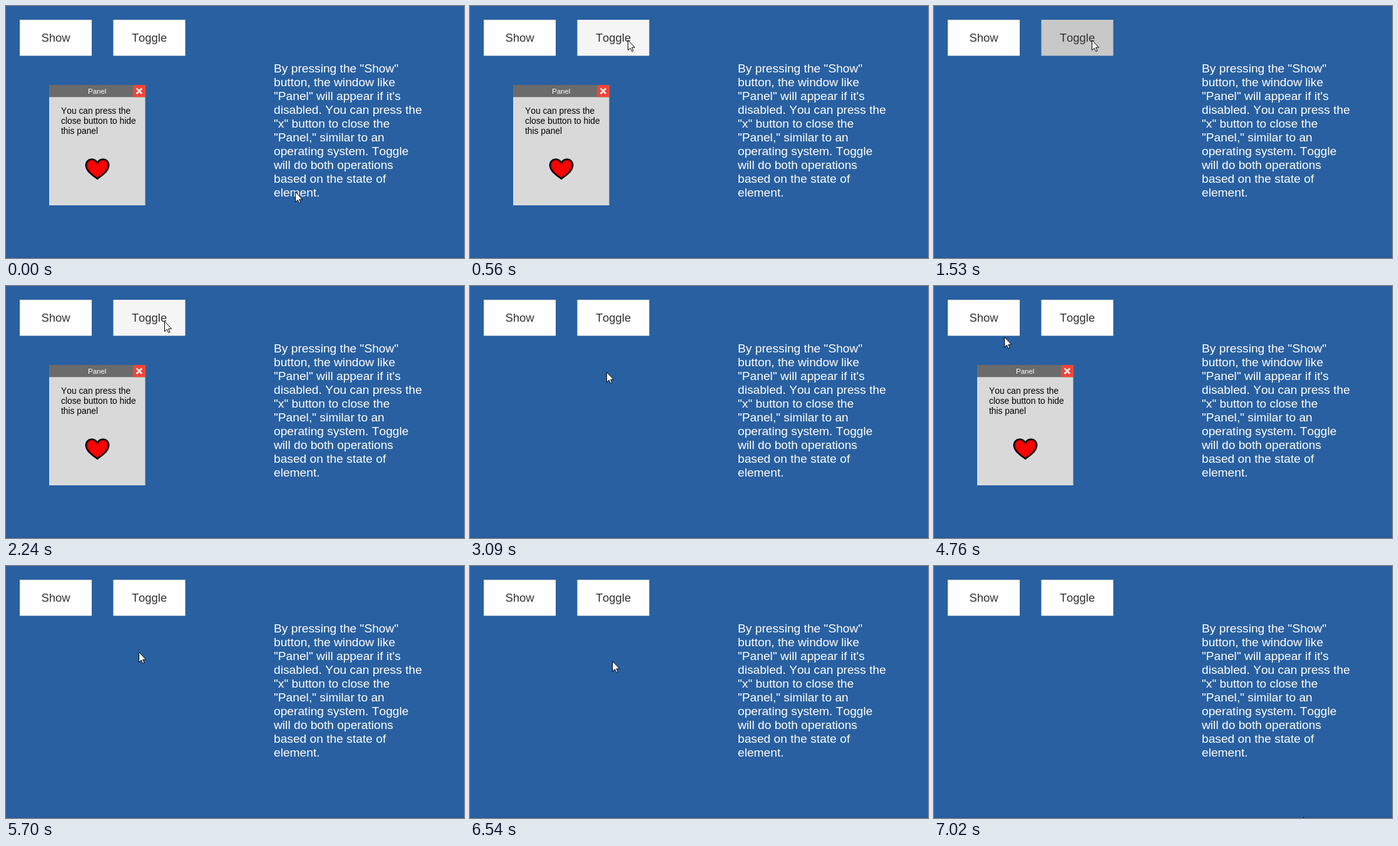
Recreate the animation shown at these times as an HTML page. Size 732 by 402 pixels, loop 7040 ms.

```html
<!DOCTYPE html>
<html lang="en">
<head>
<meta charset="utf-8">
<title>Show and toggle panel</title>
<style>
  html, body { margin: 0; width: 100%; height: 100%; overflow: hidden; background: #2960a1; }
  svg { display: block; width: 732px; height: 402px; }
  text { font-family: "Liberation Sans", Arial, sans-serif; font-kerning: none; white-space: pre; }
  .label { font-size: 18.4px; fill: #323232; text-anchor: middle; }
  .title { font-size: 11.5px; fill: #fff; text-anchor: middle; }
  .note { font-size: 13.8px; fill: #000; }
  .info { font-size: 19.2px; fill: #fff; }
</style>
</head>
<body>
<svg viewBox="0 0 732 402">
  <rect width="732" height="402" fill="#2960a1"/>
  <rect y="400.5" width="732" height="1.5" fill="#265a98"/>

  <rect id="show" x="22" y="22" width="115" height="57.4" fill="#fff"/>
  <text class="label" x="79.5" y="57">Show</text>
  <rect id="toggle" x="171.5" y="22" width="115" height="57.4" fill="#fff"/>
  <text class="label" x="229" y="57">Toggle</text>

  <g id="info"></g>

  <g id="panel">
    <rect x="69" y="126" width="153.5" height="192" fill="#d9d9d9"/>
    <rect x="69" y="126" width="153.5" height="19.3" fill="#6b6b6b"/>
    <text class="title" x="145.7" y="139.7">Panel</text>
    <rect id="close" x="203.2" y="126" width="19.3" height="19.3" fill="#f44336"/>
    <path d="M208.6 131.4l8.6 8.6M217.2 131.4l-8.6 8.6" stroke="#fff" stroke-width="2.5"/>
    <g id="note"></g>
    <path d="M146 275.3C139 270.500 128 263.500 128 254C128 248.500 132 244.700 136.700 244.700C141 244.700 144.300 247 146 250.500C147.700 247 151 244.700 155.300 244.700C160 244.700 164 248.500 164 254C164 263.500 153 270.500 146 275.300Z"
          fill="#f00" stroke="#000" stroke-width="2.8" stroke-linejoin="round"/>
  </g>

  <path id="cursor" d="M.5 .5V16.600L4.200 13.100L6.700 18.500L9 17.500L6.600 12.200H11.500Z"
        fill="#fff" stroke="#000" stroke-linejoin="round"/>
</svg>
<script>
const LOOP = 7040;
const HOLD = 'steps(1, end)';
const GLIDE = 'cubic-bezier(.4, .1, .5, 1)';
const $ = id => document.getElementById(id);

function lines(id, x, y, step, rows) {
  rows.forEach((row, i) => {
    const text = document.createElementNS('http://www.w3.org/2000/svg', 'text');
    text.setAttribute('class', id);
    text.setAttribute('x', x);
    text.setAttribute('y', y + i * step);
    text.textContent = row;
    $(id).append(text);
  });
}

// Each step is [time in ms, value, easing towards the next step].
function play(id, prop, steps) {
  const frames = steps.map(([t, value, easing = HOLD]) => ({ offset: t / LOOP, [prop]: value, easing }));
  frames.push({ offset: 1, [prop]: steps[steps.length - 1][1] });
  $(id).animate(frames, { duration: LOOP, iterations: Infinity }).startTime = 0;
}

lines('info', 428, 106, 22.03, [
  'By pressing the "Show"', 'button, the window like', '"Panel" will appear if it\'s',
  'disabled. You can press the', '"x" button to close the', '"Panel," similar to an',
  'operating system. Toggle', 'will do both operations', 'based on the state of', 'element.'
]);
lines('note', 88, 172, 15.9, ['You can press the', 'close button to hide', 'this panel']);

const path = [
  [0, 474, 310, 'cubic-bezier(.35, .15, .5, 1)'],
  [560, 252, 54],
  [1860, 253, 56],
  [2240, 253, 56, 'ease-in'],
  [2460, 220, 104, 'ease-out'],
  [2620, 204, 133, 'ease-in-out'],
  [2750, 218, 137],
  [3520, 218, 137, GLIDE],
  [4140, 100, 64],
  [4670, 100, 64, 'ease-in'],
  [4760, 112, 81, 'cubic-bezier(.25, .25, .5, 1)'],
  [5370, 211, 137],
  [5390, 212, 137],
  [6350, 212, 137, 'ease-out'],
  [6450, 209, 139, 'cubic-bezier(.45, .05, .75, .8)'],
  [7020, 590, 400]
];
play('cursor', 'transform', path.map(([t, x, y, easing]) => [t, `translate(${x}px, ${y}px)`, easing]));

play('panel', 'visibility', [
  [0, 'visible'], [630, 'hidden'], [1660, 'visible'], [3090, 'hidden'], [4370, 'visible'], [5700, 'hidden']
]);

const IDLE = '#ffffff', HOVER = '#f5f5f5', PRESS = '#c8c8c8';
play('toggle', 'fill', [
  [0, IDLE], [440, IDLE, 'linear'], [540, HOVER], [630, PRESS], [760, '#dedede'], [780, HOVER],
  [1530, PRESS], [1660, HOVER], [2350, HOVER, 'linear'], [2450, IDLE]
]);
play('show', 'fill', [
  [0, IDLE], [3940, IDLE, 'linear'], [4040, HOVER], [4240, PRESS], [4440, HOVER],
  [4690, HOVER, 'linear'], [4770, IDLE]
]);

const RED = '#f44336', RED_HOVER = '#ea4034', RED_PRESS = '#bf352a';
play('close', 'fill', [
  [0, RED], [2620, RED, 'linear'], [2720, RED_HOVER], [2960, RED_PRESS], [3090, RED],
  [5200, RED, 'linear'], [5300, RED_HOVER], [5570, RED_PRESS], [5700, RED]
]);
</script>
</body>
</html>
```
